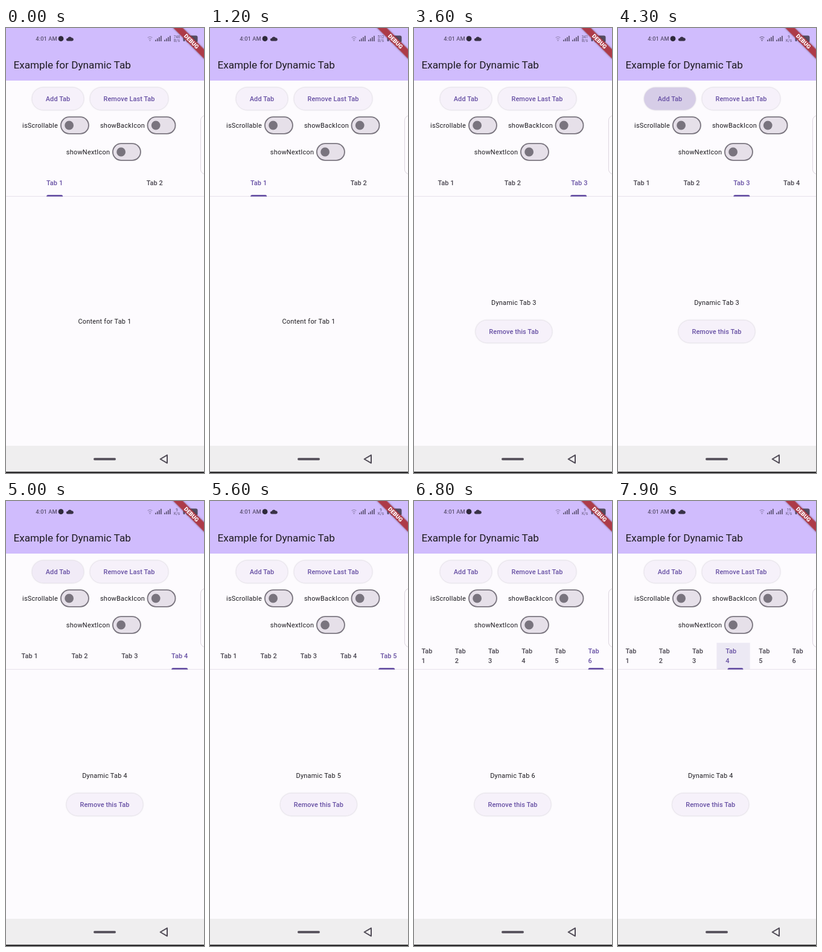
An HTML page that plays this animation: 328 px wide and 736 px high, repeating every 8 s.

```html
<!DOCTYPE html>
<html lang="en">
<head>
<meta charset="utf-8">
<title>Example for Dynamic Tab</title>
<style>
  html, body { margin: 0; width: 100%; height: 100%; overflow: hidden; background: #fdfbfe; }
  svg { display: block; width: 328px; height: 736px; }
  text { font-family: Roboto, sans-serif; font-size: 10.95px; letter-spacing: .23px; fill: #1d1b20; white-space: pre; }
  .mid { text-anchor: middle; }
  .label { font-weight: 500; letter-spacing: .09px; }
  .accent { fill: #6750a4; }
  .button { fill: #f6f1fa; filter: drop-shadow(0 .9px .8px rgba(40, 30, 60, .27)); }
  .track { fill: #e6e0e9; stroke: #79747e; stroke-width: 1.84; }
  .thumb { fill: #79747e; }
  .status { fill: #5c5273; }
  .speed { font-size: 6.3px; letter-spacing: 0; text-anchor: middle; }
</style>
</head>
<body>
<svg id="stage" viewBox="0 0 328 736">
  <rect width="328" height="736" fill="#fdfbfe"/>
  <g id="pages"></g>
  <rect width="328" height="87" fill="#d0bcfd"/>

  <g class="status" id="status">
    <text class="status" x="49.3" y="21.2" style="font-size:9.3px;font-weight:500;letter-spacing:.05px">4:01 AM</text>
    <circle cx="91" cy="17.7" r="4.4" fill="#2f2a3b"/>
    <path d="M102 21.5a2.3 2.3 0 0 1 .2-4.6a3.7 3.7 0 0 1 6.7-.6a2.6 2.6 0 0 1 .6 5.2z" fill="#393247"/>
    <g id="wifi" fill="none" stroke="#5c5273" stroke-width="1.1">
      <path d="M234.6 16.2q3.9-3.3 7.8 0M236.2 18.4q2.3-1.9 4.6 0"/>
      <circle cx="238.5" cy="20.6" r=".6"/>
    </g>
    <text class="speed status" id="rate" x="283" y="17.2"></text>
    <text class="speed status" id="unit" x="283" y="23.2"></text>
    <rect x="293.5" y="14" width="3" height="8" rx="1"/>
    <rect x="299" y="12.5" width="18.5" height="11.5" rx="3" fill="#554c62"/>
  </g>
  <text x="12.4" y="67.2" style="font-size:17.2px;letter-spacing:0">Example for Dynamic Tab</text>

  <g id="controls"></g>
  <rect y="277.9" width="328" height=".95" fill="#e5dfe9"/>
  <rect id="splash" y="234.6" height="43.3" fill="#6750a4" opacity=".11"/>
  <g id="tabs"></g>
  <path id="bar" class="accent"/>

  <rect x="322.4" y="144.8" width="20" height="97" rx="8" fill="#fefcff" stroke="#dbd4de"/>

  <rect y="691" width="328" height="43" fill="#efeeef"/>
  <rect y="733.8" width="328" height="2.2" fill="#29282a"/>
  <rect x="145" y="711" width="37" height="4" rx="2" fill="#5b5660"/>
  <path d="M255.6 713L267 706.4V719.6Z" fill="none" stroke="#514c57" stroke-width="2" stroke-linejoin="round"/>

  <g transform="translate(307.2 22.1) rotate(45)">
    <rect x="-45" y="-5.5" width="90" height="11" fill="#ad3b48" style="filter:drop-shadow(0 0 1.5px rgba(0,0,0,.4))"/>
    <text class="mid" y="3.3" style="font-size:9.4px;font-weight:900;letter-spacing:0;fill:#fff">DEBUG</text>
  </g>
</svg>
<script>
const LOOP = 8000, STEP = 100, SLIDE = 300;
const WIDTH = 331.3, LEFT = -2.2, CENTER = 163.5;
const PAD = 14.7, LABEL = 27;

// Tab bar states: shown from `at`, sliding since `start`
const states = [
  { at: 0, start: -SLIDE, n: 2, from: 1, to: 1 },
  { at: 3500, start: 3330, n: 3, from: 1, to: 3 },
  { at: 4300, start: 4300, n: 4, from: 3, to: 4 },
  { at: 5400, start: 5383, n: 5, from: 4, to: 5 },
  { at: 6300, start: 6300, n: 6, from: 5, to: 6 },
  { at: 7900, start: 7667, n: 6, from: 6, to: 4, splash: 4 }
];
const rates = [
  { at: 0, rate: '746', unit: 'B/s' },
  { at: 1200, rate: '512', unit: 'B/s' },
  { at: 3000, rate: '341', unit: 'B/s' },
  { at: 4200, rate: '9', unit: 'K/s' },
  { at: 7200, rate: '19', unit: 'K/s' }
];
// Press ink on "Add Tab": [time, opacity]
const ink = [
  [3300, 0], [3400, .07], [3500, .05], [3600, 0],
  [3800, 0], [3900, .03], [4200, .18], [4300, .22], [4600, 0],
  [4900, 0], [5000, .03], [5300, .16], [5400, .14], [5600, 0],
  [5900, 0], [6000, .03], [6300, .12], [6700, 0]
];

const $ = id => document.getElementById(id);

function add(parent, tag, attrs, text) {
  const node = document.createElementNS('http://www.w3.org/2000/svg', tag);
  for (const key in attrs) node.setAttribute(key, attrs[key]);
  if (text) node.textContent = text;
  return parent.appendChild(node);
}

function button(parent, cx, cy, w, text) {
  const box = { x: cx - w / 2, y: cy - 18.4, width: w, height: 36.8, rx: 18.4 };
  add(parent, 'rect', { ...box, class: 'button' });
  const press = add(parent, 'rect', { ...box, class: 'accent', opacity: 0 });
  add(parent, 'text', { x: cx, y: cy + 4, class: 'mid label accent' }, text);
  return press;
}

function toggle(x, cy, text, trackX) {
  const g = $('controls');
  add(g, 'text', { x, y: cy + 4 }, text);
  add(g, 'rect', { x: trackX + .92, y: cy - 13.8, width: 46, height: 27.6, rx: 13.8, class: 'track' });
  add(g, 'circle', { cx: trackX + 14.6, cy, r: 7.4, class: 'thumb' });
}

const press = button($('controls'), 86, 117, 85.4, 'Add Tab');
button($('controls'), 204, 117, 129.4, 'Remove Last Tab');
toggle(27, 161, 'isScrollable', 90);
toggle(156, 161, 'showBackIcon', 233.6);
toggle(99.8, 205, 'showNextIcon', 176);

for (const x of [247, 262])
  for (let i = 0; i < 4; i++)
    add($('status'), 'rect', { x: x + i * 3, y: 19.5 - i * 2.2, width: 1.7, height: 2.5 + i * 2.2 });

const pages = [], tabs = [];
for (let i = 1; i <= 6; i++) {
  const page = pages[i] = add($('pages'), 'g', {});
  if (i < 3) {
    add(page, 'text', { x: CENTER, y: 489, class: 'mid' }, 'Content for Tab ' + i);
  } else {
    add(page, 'text', { x: CENTER, y: 457.8, class: 'mid' }, 'Dynamic Tab ' + i);
    button(page, CENTER, 502, 126.6, 'Remove this Tab');
  }
  const g = add($('tabs'), 'g', {});
  tabs[i] = {
    g,
    line: add(g, 'text', { y: 260.2, class: 'mid label' }, 'Tab ' + i),
    top: add(g, 'text', { y: 252.2, class: 'label' }, 'Tab'),
    bottom: add(g, 'text', { y: 267.9, class: 'label' }, String(i))
  };
}

const show = (node, on) => node.setAttribute('display', on ? 'inline' : 'none');
const mix = (a, b, p) => a + (b - a) * p;
const current = (list, t) => list.filter(s => s.at <= t).pop();

// cubic-bezier(.25, .1, .25, 1)
function ease(x) {
  if (x <= 0) return 0;
  if (x >= 1) return 1;
  const curve = (a, b, u) => 3 * a * u * (1 - u) ** 2 + 3 * b * u * u * (1 - u) + u ** 3;
  let lo = 0, hi = 1;
  for (let i = 0; i < 24; i++) {
    const u = (lo + hi) / 2;
    if (curve(.25, .25, u) < x) lo = u; else hi = u;
  }
  return curve(.1, 1, lo);
}

function along(points, t) {
  const i = points.findIndex(p => p[0] > t);
  if (i < 1) return 0;
  const [t0, a] = points[i - 1], [t1, b] = points[i];
  return mix(a, b, (t - t0) / (t1 - t0));
}

function tint(amount) {
  const off = [73, 69, 79], on = [103, 80, 164];
  return `rgb(${off.map((c, i) => Math.round(mix(c, on[i], amount)))})`;
}

function drawTabs(s, p) {
  const w = WIDTH / s.n, wrap = s.n > 5;
  const barWidth = wrap ? w - 2 * PAD : LABEL;
  for (let i = 1; i <= 6; i++) {
    const tab = tabs[i], x = LEFT + (i - 1) * w;
    show(tab.g, i <= s.n);
    show(tab.line, !wrap);
    show(tab.top, wrap);
    show(tab.bottom, wrap);
    tab.line.setAttribute('x', x + w / 2);
    tab.top.setAttribute('x', x + PAD);
    tab.bottom.setAttribute('x', x + PAD);
    const color = tint(i === s.to ? p : i === s.from ? 1 - p : 0);
    for (const part of [tab.line, tab.top, tab.bottom]) part.style.fill = color;
  }
  const x = LEFT + (mix(s.from, s.to, p) - .5) * w - barWidth / 2;
  $('bar').setAttribute('d', `M${x} 278.8v-.3q0-2.5 2.5-2.5h${barWidth - 5}q2.5 0 2.5 2.5v.3z`);
  show($('splash'), s.splash);
  if (s.splash) {
    $('splash').setAttribute('x', LEFT + (s.splash - 1) * w);
    $('splash').setAttribute('width', w);
  }
}

function drawPages(s, p) {
  const dir = Math.sign(s.to - s.from);
  pages.forEach((page, i) => {
    const leaving = i === s.from && p < 1;
    show(page, i === s.to || leaving);
    const shift = i === s.to ? dir * (1 - p) : -dir * p;
    page.setAttribute('transform', `translate(${shift * WIDTH} 0)`);
  });
}

function render(t) {
  const s = current(states, t), p = ease((t - s.start) / SLIDE);
  drawTabs(s, p);
  drawPages(s, p);
  press.setAttribute('opacity', along(ink, t));
  const net = current(rates, t);
  $('rate').textContent = net.rate;
  $('unit').textContent = net.unit;
  $('wifi').setAttribute('opacity', t >= 4200 && t < 5000 ? .85 : .5);
}

const begin = performance.now();
function tick() {
  const t = (performance.now() - begin) % LOOP;
  render(Math.floor(t / STEP) * STEP);
  requestAnimationFrame(tick);
}
tick();
</script>
</body>
</html>
```
